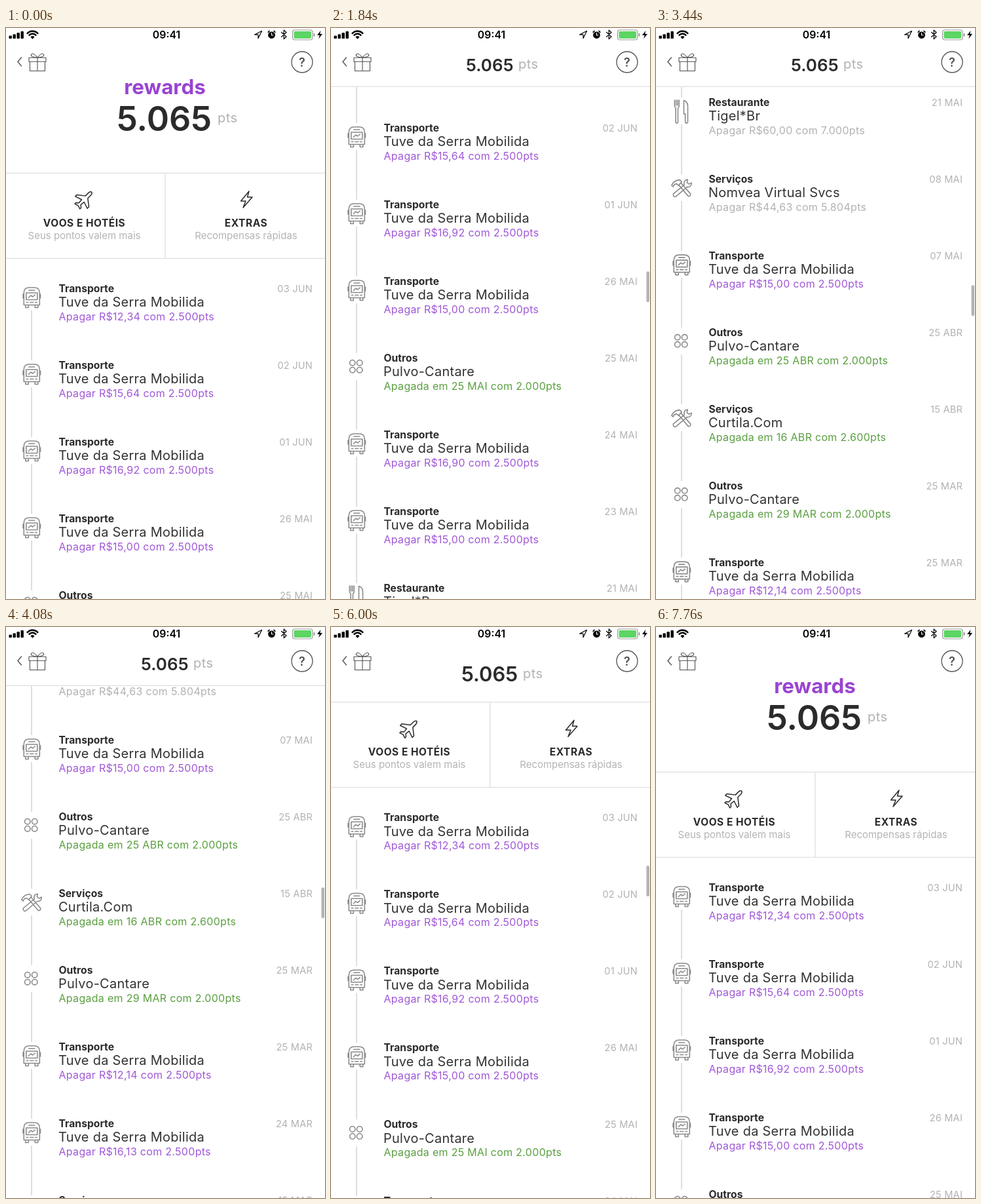
An HTML page with a canvas for the animation above (7840 ms loop, 487x871 px).

```html
<!DOCTYPE html>
<html lang="pt-BR">
<head>
<meta charset="utf-8">
<title>Rewards</title>
<style>
  html, body { margin: 0; width: 100%; height: 100%; overflow: hidden; background: #fff; }
  canvas { display: block; width: 487px; height: 871px; }
</style>
</head>
<body>
<canvas id="stage"></canvas>
<script>
const W = 487, H = 871, LOOP = 7840, STEP = 80;
const ROW_GAP = 117, ROW_TOP = 397, TILE_TOP = 221, TILE_END = 351, BAR_END = 89;
const INK = '#2b2b2b', PALE = '#b2b2b2', RULE = '#e0e0e0', ICON = '#8b8b8b', LINE = '#505050';
const PURPLE = '#a058d8', GREEN = '#5a9f40';

const canvas = document.getElementById('stage');
const ctx = canvas.getContext('2d');
const ratio = window.devicePixelRatio || 1;
canvas.width = W * ratio;
canvas.height = H * ratio;

const RIDE = 'Tuve da Serra Mobilida', MUSIC = 'Pulvo-Cantare';

const ride = (date, price) =>
  ({ kind: 'Transporte', name: RIDE, date, note: `Apagar R$${price} com 2.500pts`, tint: PURPLE });
const open = (kind, name, date, price, pts) =>
  ({ kind, name, date, note: `Apagar R$${price} com ${pts}pts`, tint: PALE });
const paid = (kind, name, date, day, pts) =>
  ({ kind, name, date, note: `Apagada em ${day} com ${pts}pts`, tint: GREEN });

const rows = [
  ride('03 JUN', '12,34'),
  ride('02 JUN', '15,64'),
  ride('01 JUN', '16,92'),
  ride('26 MAI', '15,00'),
  paid('Outros', MUSIC, '25 MAI', '25 MAI', '2.000'),
  ride('24 MAI', '16,90'),
  ride('23 MAI', '15,00'),
  open('Restaurante', 'Tigel*Br', '21 MAI', '60,00', '7.000'),
  open('Serviços', 'Nomvea Virtual Svcs', '08 MAI', '44,63', '5.804'),
  ride('07 MAI', '15,00'),
  paid('Outros', MUSIC, '25 ABR', '25 ABR', '2.000'),
  paid('Serviços', 'Curtila.Com', '15 ABR', '16 ABR', '2.600'),
  paid('Outros', MUSIC, '25 MAR', '29 MAR', '2.000'),
  ride('25 MAR', '12,14'),
  ride('24 MAR', '16,13'),
  paid('Serviços', 'Curtila.Com', '15 MAR', '16 MAR', '2.600')
];

// Row icons are drawn around their own centre.
const icons = {
  Transporte: new Path2D('M-12 11.5V-7Q-12 -15 -4 -15H4Q12 -15 12 -7V11.5Z M-4.5 -11H4.5' +
    'M-8.5 -7H8.5V3.5H-8.5Z M-5 0.5L-1.5 -3L1.5 -1L5 -4' +
    'M-13.2 -5V1M13.2 -5V1 M-8 7.5h2.5M5.5 7.5h2.5M-2.5 7.5h5' +
    'M-9.5 11.5V15.5H-5V11.5M9.5 11.5V15.5H5V11.5'),
  Outros: new Path2D(),
  Restaurante: new Path2D('M-11 -17V-9Q-11 -6 -9.2 -5V16Q-9.2 18 -7.5 18Q-5.8 18 -5.8 16V-5' +
    'Q-4 -6 -4 -9V-17M-8.7 -17v8M-6.3 -17v8' +
    'M3.2 -16.5Q9.2 -15 9.2 -8V16Q9.2 18 7.3 18Q5.4 18 5.4 16V4H3.2Z'),
  Serviços: new Path2D('M-15.5 -4Q-12 -12 -3 -12.5L0 -9.5L-5 -4L-8 -6.5Q-12 -6 -13 -2Z' +
    'M-4 -4L10 12.5Q13.5 13 13.5 9L-1 -7.5' +
    'M-13 9L4 -5Q2 -12 9 -13L8 -8.5L11 -6L15 -8Q15 -1 8 -1.5L-9 13Q-13 14.5 -13 9Z')
};
for (const x of [-6.5, 4.4]) {
  for (const y of [-6.3, 4.7]) {
    icons.Outros.moveTo(x + 4.2, y);
    icons.Outros.arc(x, y, 4.2, 0, 7);
  }
}

const art = {
  gift: new Path2D('M35 45.3H61V51.3H35Z M36.5 51.3V65.5H59.5V51.3 M48 45.3V65.5' +
    'M48 45Q37 44.5 38.5 40.5Q41 36.5 48 45Q55 36.5 57.5 40.5Q59 44.5 48 45'),
  back: new Path2D('M23.5 45L18 51.5L23.5 58'),
  plane: new Path2D('M0 -16Q2.6 -15 2.6 -11V-5L13 3V6.5L2.6 3L2 9.5L5.5 12.5V15L0 13.2' +
    'L-5.5 15V12.5L-2 9.5L-2.6 3L-13 6.5V3L-2.6 -5V-11Q-2.6 -15 0 -16Z'),
  flash: new Path2D('M371 249L358.5 264H366L362 274L376 258H368.5Z'),
  arrow: new Path2D('M390.5 4.5L379.5 10.2H385V15.8Z'),
  tooth: new Path2D('M420.5 6.5L428 13.3L424.2 16.8V3.2L428 6.7L420.5 13.5'),
  charge: new Path2D('M480.5 4L475 11H478.8L477.2 16.5L483 9H479.3Z')
};

const clamp = (v, a, b) => Math.min(b, Math.max(a, v));
const mix = (a, b, u) => a + (b - a) * u;
const flick = u => 1 - Math.pow(1 - Math.pow(u, 1.5), 3);

function track(keys, t, ease = u => u) {
  if (t <= keys[0][0]) return keys[0][1];
  for (let i = 1; i < keys.length; i++) {
    const [t0, v0] = keys[i - 1], [t1, v1] = keys[i];
    if (t <= t1) return mix(v0, v1, ease((t - t0) / (t1 - t0)));
  }
  return keys[keys.length - 1][1];
}

const scrollKeys = [
  [960, 0], [1840, 362], [2880, 724], [4080, 1278], [4160, 1280],
  [4720, 269], [5760, 269], [6400, -30], [6560, -8], [6800, 0]
];
const thumbKeys = [
  [960, 0], [1040, 1], [4560, 1], [4880, 0],
  [5760, 0], [5840, 1], [6720, 1], [7120, 0]
];

function text(str, x, y, size, color, { weight = 400, align = 'left', gap = 0 } = {}) {
  ctx.font = `${weight} ${size}px Inter, "Open Sans", sans-serif`;
  ctx.letterSpacing = gap + 'px';
  ctx.textAlign = align;
  ctx.fillStyle = color;
  ctx.fillText(str, x, y);
}

function stroke(path, color, width) {
  ctx.strokeStyle = color;
  ctx.lineWidth = width;
  ctx.stroke(path);
}

function rect(x, y, w, h, color, r = 0) {
  ctx.fillStyle = color;
  ctx.beginPath();
  ctx.roundRect(x, y, w, h, r);
  ctx.fill();
}

function circle(x, y, r, color, width) {
  const p = new Path2D();
  p.arc(x, y, r, 0, 7);
  stroke(p, color, width);
}

function drawRow(row, y, last) {
  ctx.save();
  ctx.translate(39.3, y + 14);
  stroke(icons[row.kind], ICON, 1.6);
  ctx.restore();
  if (!last) rect(38.3, y + 34, 1.5, 76, '#d4d4d4');
  text(row.kind, 80.5, y + 5.5, 15.7, INK, { weight: 700 });
  text(row.name, 80, y + 28.2, 20, '#333', { gap: 0.25 });
  text(row.note, 80.5, y + 48.5, 16, row.tint, { gap: 0.3 });
  text(row.date, 468, y + 5.5, 14.6, PALE, { align: 'right', gap: 0.2 });
}

function drawList(scroll) {
  rows.forEach((row, i) => {
    const y = ROW_TOP + i * ROW_GAP - scroll;
    if (y > -80 && y < H + 20) drawRow(row, y, i === rows.length - 1);
  });
}

function drawTiles(shift) {
  const mid = { align: 'center' }, bold = { align: 'center', weight: 700, gap: 0.5 };
  ctx.save();
  ctx.translate(0, -shift);
  rect(0, TILE_TOP, W, TILE_END - TILE_TOP, '#fff');
  rect(242.3, TILE_TOP, 1.3, TILE_END - TILE_TOP, RULE);
  rect(0, TILE_END - 0.3, W, 1.3, RULE);
  text('VOOS E HOTÉIS', 119.5, 302.5, 15.5, INK, bold);
  text('Seus pontos valem mais', 119.5, 322, 15, '#b4b4b4', mid);
  text('EXTRAS', 366.5, 302.5, 15.5, INK, bold);
  text('Recompensas rápidas', 366.5, 322, 15, '#b4b4b4', mid);
  stroke(art.flash, INK, 1.5);
  ctx.translate(119.5, 261.5);
  ctx.rotate(Math.PI / 4);
  stroke(art.plane, INK, 1.5);
  ctx.restore();
}

function drawHeader(shift) {
  const end = Math.max(BAR_END, TILE_TOP - shift);
  const u = clamp(shift / (TILE_TOP - BAR_END), 0, 1);
  rect(0, 0, W, end, '#fff');
  rect(0, end - 0.3, W, 1.3, RULE);

  ctx.globalAlpha = clamp(1 - u * 1.7, 0, 1);
  text('rewards', 242.5, 101 - shift * 0.5, 31.4, '#9944d2', { weight: 700, align: 'center' });
  ctx.globalAlpha = 1;
  text('5.065', mix(169, 206, u), mix(156.5, 65.5, u), mix(52, 26, u), INK, { weight: 600 });
  text('pts', mix(323, 286, u), mix(143.5, 62, u), 20, PALE, { gap: 0.4 });

  stroke(art.back, LINE, 1.3);
  stroke(art.gift, LINE, 1.1);
  circle(452, 52, 16, LINE, 1.3);
  text('?', 452, 58.5, 18, LINE, { weight: 600, align: 'center' });
}

function drawStatus() {
  for (let i = 0; i < 4; i++) {
    const h = 4.5 + i * 2.3;
    rect(4.5 + i * 6, 16.3 - h, 4.4, h, '#000', 1);
  }
  for (const r of [10.8, 6.8]) {
    const p = new Path2D();
    p.arc(40.5, 15.5, r, -Math.PI * 0.76, -Math.PI * 0.24);
    stroke(p, '#000', 2.5);
  }
  ctx.fillStyle = '#000';
  ctx.beginPath();
  ctx.moveTo(40.5, 17);
  ctx.arc(40.5, 16.5, 4.2, -Math.PI * 0.76, -Math.PI * 0.24);
  ctx.fill();

  text('09:41', 245, 16.2, 15.8, '#000', { weight: 600, align: 'center' });

  stroke(art.arrow, '#000', 1.2);
  ctx.beginPath();
  ctx.arc(405.5, 10.8, 5.4, 0, 7);
  ctx.fill();
  stroke(new Path2D('M400.2 6.3L402 4.5M410.8 6.3L409 4.5'), '#000', 1.7);
  stroke(new Path2D('M405.5 7.5V11H408'), '#fff', 1.2);
  stroke(art.tooth, '#000', 1.2);

  ctx.beginPath();
  ctx.roundRect(437.5, 3, 30.5, 15, 3.5);
  ctx.strokeStyle = '#999';
  ctx.lineWidth = 1.2;
  ctx.stroke();
  rect(439.5, 5, 26.5, 11, '#5cd563', 1.8);
  rect(469.5, 8, 2, 5, '#999', 1);
  ctx.fillStyle = '#000';
  ctx.fill(art.charge);
}

function drawThumb(scroll, alpha) {
  if (!alpha) return;
  const over = Math.min(0, scroll);
  ctx.globalAlpha = alpha;
  rect(481.5, 361 + Math.max(0, scroll) * 0.0283, 4.5, 47 + over * 0.9, '#b3b3b3', 2.2);
  ctx.globalAlpha = 1;
}

function draw(now) {
  const t = Math.floor((now % LOOP) / STEP) * STEP;
  const scroll = track(scrollKeys, t, flick);
  const shift = Math.max(0, scroll);

  ctx.setTransform(ratio, 0, 0, ratio, 0, 0);
  ctx.lineJoin = ctx.lineCap = 'round';
  rect(0, 0, W, H, '#fff');
  drawList(scroll);
  drawTiles(shift);
  drawHeader(shift);
  drawStatus();
  drawThumb(scroll, track(thumbKeys, t));
}

const start = performance.now();
function tick() {
  draw(performance.now() - start);
  requestAnimationFrame(tick);
}
tick();
</script>
</body>
</html>
```
